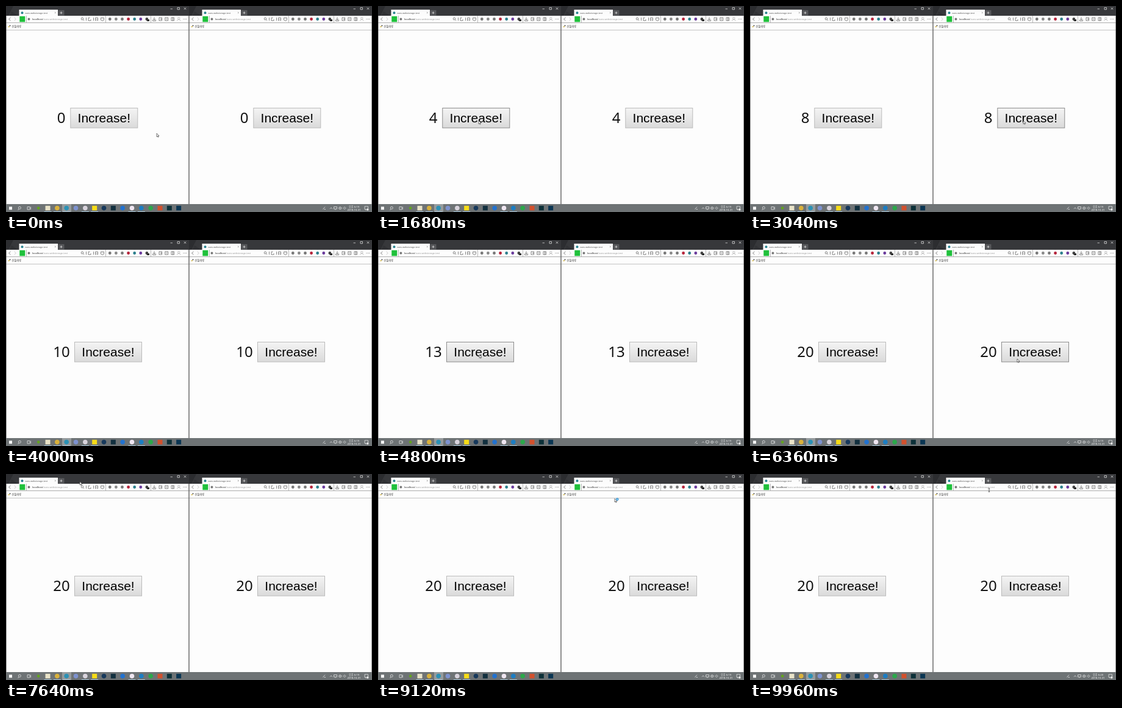
Animation, 600 px wide and 338 px high, one loop 10000 ms. Source, as an HTML page:

```html
<!DOCTYPE html>
<html lang="ko">
<head>
<meta charset="utf-8">
<title>Counter in two windows</title>
<style>
html, body { margin: 0; width: 100%; height: 100%; overflow: hidden; background: #fdfdfd; }
svg { display: block; width: 100vw; height: 100vh; }
text { font-family: "Noto Sans", "Noto Sans CJK KR", "Noto Sans CJK", sans-serif; white-space: pre; }
.line { fill: none; stroke: #555; stroke-width: .7; }
.num { font-size: 24px; text-anchor: middle; fill: #111; }
.label { font: 21px Arial, "Liberation Sans", sans-serif; text-anchor: middle; }
.clock { font-size: 4.2px; text-anchor: middle; fill: #fff; }
</style>
</head>
<body>
<svg id="stage" viewBox="0 0 600 338" preserveAspectRatio="none">
  <defs>
    <linearGradient id="face" x2="0" y2="1">
      <stop offset="0" stop-color="#f4f4f4"/>
      <stop offset="1" stop-color="#dadada"/>
    </linearGradient>
  </defs>
  <g id="windows"></g>
  <g id="taskbar"></g>
  <g id="cursor">
    <path id="arrow" d="M0 0V5.6L1.3 4.4L2.2 6.3L3.1 5.9L2.3 4.1H4.1Z" fill="#fff" stroke="#222" stroke-width=".6"/>
    <circle id="busy" cx="4.3" cy="1" r="1.8" fill="#8fd0f5" stroke="#1583cc" stroke-width="1"/>
    <path id="beam" d="M-1.2 -2.7H1.2M0 -2.7V2.7M-1.2 2.7H1.2" fill="none" stroke="#222" stroke-width=".7"/>
  </g>
</svg>
<script>
const LOOP = 10000;
const $ = id => document.getElementById(id);
const rect = (x, y, w, h, fill, more = "") =>
  `<rect x="${x}" y="${y}" width="${w}" height="${h}" fill="${fill}" ${more}/>`;
const dot = (x, y, r, fill) => `<circle cx="${x}" cy="${y}" r="${r}" fill="${fill}"/>`;
const path = (d, more = "") => `<path class="line" d="${d}" ${more}/>`;
const text = (x, y, size, fill, s) =>
  `<text x="${x}" y="${y}" font-size="${size}" fill="${fill}">${s}</text>`;

function titleBar() {
  return rect(0, 0, 300, 16, "#37383b")
    + `<path d="M0 0H12L4 16H0Z" fill="#2c2d30"/><path d="M9 9L20 16H6Z" fill="#303134"/>`
    + rect(21.5, 6, 63.5, 10.5, "#fcfcfc")
    + dot(26.5, 11.2, 2, "#27828f")
    + text(31, 12.6, 3.65, "#555", "vuex-webstorage-test")
    + path("M79.6 9.8L82 12.2M82 9.8L79.6 12.2", 'style="stroke:#888;stroke-width:.5"')
    + rect(85.5, 6.8, 10, 8.7, "#56575a")
    + path("M88.5 11.2H92.5M90.5 9.2V13.2", 'style="stroke:#eee"')
    + path("M269.5 4.8H273M281 2.5H284.5V5.8H281ZM291.8 2.5L295.2 5.9M295.2 2.5L291.8 5.9", 'style="stroke:#eee"');
}

function toolBar() {
  const addons = ["#777", "#888", "#777", "#b5233a", "#2b7f8c", "#6a3a9c", "#444"];
  return rect(0, 16, 300, 23, "#fdfdfd")
    + path("M7.5 19L4.5 21.5L7.5 24")
    + path("M13.5 19L16.5 21.5L13.5 24", 'style="stroke:#bbb"')
    + rect(22.3, 16.8, 9, 9.4, "#20c13c")
    + path("M33.5 16V27M163.5 16V27M237.5 16V27", 'style="stroke:#999"')
    + dot(37.5, 21.5, 1.9, "#777")
    + text(43, 23, 4.05, "#222", "localhost")
    + text(60.2, 23, 3.9, "#999", "/vuex-webstorage-test")
    + path("M126.6 22.4L128 24M131.5 19V24M137.5 19.5H135V24H139V22M143.5 19V24M146.5 19.5H150.5V23.8L148.5 22.5L146.5 23.8ZM155.5 19.5H160.5V23L158 24.4L155.5 23Z")
    + `<circle class="line" cx="125" cy="21" r="1.8"/>`
    + addons.map((c, i) => dot(170.3 + i * 10.1, 21.5, 2.4, c)).join("")
    + rect(231, 22, 4, 3, "#333")
    + path("M243 18.5V23M241 21L243 23L245 21M240.5 22.5V24.5H245.5V22.5M251 19H255.5V24H251ZM253 21.5H256M260.8 19H265.6V24H260.8ZM263.2 20.4V22.6M271 19H275.5V24H271ZM273.5 19V24")
    + path("M280.6 24.4Q280.8 22 283.3 22Q285.8 22 286 24.4M281.6 20.2A1.7 1.7 0 1 1 285 20.2A1.7 1.7 0 1 1 281.6 20.2", 'style="stroke:#aaa"')
    + [291, 293.3, 295.6].map(x => dot(x, 21.5, .5, "#555")).join("")
    + path("M0 27.5H300", 'style="stroke:#8a8a8a"')
    + dot(4.8, 34, 1.1, "#d7b83c") + dot(6.5, 32.2, 1, "#444")
    + text(9.5, 34.8, 4.3, "#333", "산들마루")
    + path("M0 39.5H300", 'style="stroke:#aaa"');
}

function pane(i) {
  return `<g transform="translate(${i * 300})">`
    + rect(0, 0, 300, 325, "#fdfdfd") + titleBar() + toolBar()
    + path("M.4 16V325M299.6 16V325", 'style="stroke:#666;stroke-width:.8"')
    + `<text class="num" id="num${i}" y="191.5"></text>`
    + `<g id="btn${i}">${rect(.5, 167.5, 110, 32.5, "url(#face)", `id="edge${i}" stroke="#bbb"`)}`
    + `<text class="label" x="55.5" y="191">Increase!</text></g></g>`;
}

function taskBar() {
  const apps = ["#63a51f", "#e9e3c8", "#d9b13b", "#2b91b5", "#7d92cf", "#d8d3dc", "#f7dc17", "#17395c",
    "#12303f", "#2272cf", "#eee5f0", "#1c7dc2", "#2ba84a", "#d2512d", "#0c3038", "#0a3553"];
  const square = [1, 6, 8, 13, 14, 15];
  const running = [1, 2, 3, 5, 6, 10, 11];
  const light = 'style="stroke:#f2f2f2"';
  let s = rect(0, 325, 600, 13, "#6e7375") + rect(92, 325, 15, 13, "#969b9d");
  s += rect(5, 329.3, 5, 5, "#f4f4f4");
  s += path("M21 333L19.6 335M35 329.5H39V334H35ZM40.5 329.5V334", light)
    + `<circle class="line" cx="22.4" cy="331.2" r="2" ${light}/>`;
  apps.forEach((c, i) => {
    const x = 53.2 + i * 15.33;
    s += square.includes(i) ? rect(x - 4, 327.8, 8, 7.6, c) : dot(x, 331.6, i ? 3.8 : 2.3, c);
    if (running.includes(i)) s += rect(x - 6, 337, 12, 1, "#a9c9dc");
  });
  return s
    + path("M519.5 333.5L523 329.5M521.5 333.5H524M531 332.8L533 330.8L535 332.8M537.5 329.5H542.5V333H537.5ZM540 333V334.5M545 330.8H546.2L548 329.3V334L546.2 332.5H545M549.5 330Q551 331.7 549.5 333.3M555 329.6L557 331.6L555 333.6L553 331.6Z", light)
    + `<text class="clock" id="clock" x="570.5" y="330.8"></text>`
    + `<text class="clock" x="570.5" y="336.4">2018-10-31</text>`
    + path("M588 328.8H593.5V333.5H591L589.5 335V333.5H588Z", light)
    + dot(592.8, 334, 1.8, "#e8e8e8");
}

$("windows").innerHTML = pane(0) + pane(1);
$("taskbar").innerHTML = taskBar();

// Four bursts of five clicks, alternating left and right.
const bursts = [1120, 2560, 4350, 5640];
const clicks = bursts.flatMap(b => [0, 1, 2, 3, 4].map(i => b + i * 180));

// time, x, y
const route = [
  [0, 247, 209], [300, 247, 209], [900, 165, 188], [1960, 165, 188],
  [2480, 448, 188], [3380, 448, 188], [3700, 430, 160], [4260, 166, 188],
  [5120, 166, 188], [5480, 438, 195], [6480, 438, 195], [7100, 260, 80],
  [7600, 121, 12.5], [8200, 121, 12.5], [8900, 388, 40.5], [9250, 388, 40.5],
  [9650, 392, 26.5], [LOOP, 392, 26.5]
];

function spot(t) {
  const i = Math.max(1, route.findIndex(p => p[0] > t));
  const [t0, x0, y0] = route[i - 1], [t1, x1, y1] = route[i];
  const u = (t - t0) / (t1 - t0), e = u * u * (3 - 2 * u);
  return [x0 + (x1 - x0) * e, y0 + (y1 - y0) * e];
}

const show = (id, on) => $(id).setAttribute("visibility", on ? "visible" : "hidden");

function draw(t) {
  const n = clicks.filter(c => c <= t).length;
  const left = n > 9 ? 112 : 105.3;
  const [x, y] = spot(t);
  const hidden = t >= 3930 && t < 4080;
  const beam = t > 9400 && y < 28;
  for (const i of [0, 1]) {
    const over = !hidden && y > 167 && y < 200 && x > left + 300 * i && x < left + 300 * i + 111;
    $("num" + i).textContent = n;
    $("num" + i).setAttribute("x", n > 9 ? 91 : 90.5);
    $("btn" + i).setAttribute("transform", `translate(${left})`);
    $("edge" + i).setAttribute("stroke", over ? "#8c8c8c" : "#bbb");
  }
  $("clock").textContent = t < 9700 ? "오후 6:19" : "오후 6:20";
  $("cursor").setAttribute("transform", `translate(${x} ${y})`);
  show("arrow", !hidden && !beam);
  show("beam", beam);
  show("busy", t >= 8800 && t < 9300);
}

const start = performance.now();
function tick() {
  draw((performance.now() - start) % LOOP);
  requestAnimationFrame(tick);
}
draw(0);
requestAnimationFrame(tick);
</script>
</body>
</html>
```
